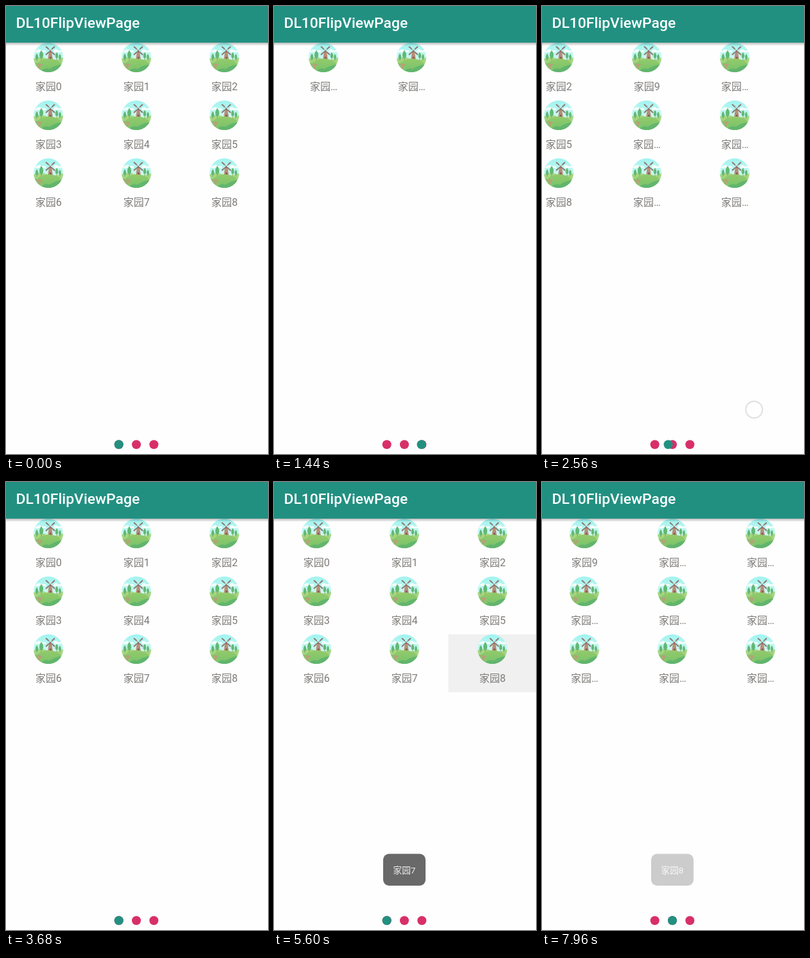
An HTML page for the animation above (8000 ms loop, 408x697 px).

```html
<!DOCTYPE html>
<html lang="zh">
<head>
<meta charset="utf-8">
<title>DL10FlipViewPage</title>
<style>
  html, body { margin: 0; width: 100%; height: 100%; overflow: hidden; background: #fefefe; }
  svg { display: block; width: 100vw; height: 100vh; }
  text { font-family: Roboto, "Noto Sans CJK SC", "Noto Sans CJK", sans-serif; }
  .label { font-size: 16px; fill: #7d7b78; text-anchor: middle; }
  .title { font-size: 22.9px; font-weight: 500; fill: #fff; }
  .toast rect { fill: #696969; }
  .toast text { font-size: 13.7px; fill: #eee; text-anchor: middle; }
</style>
</head>
<body>
<svg viewBox="0 0 408 697">
  <defs>
    <linearGradient id="sky" x2="0" y2="1">
      <stop stop-color="#9ff3f0"/><stop offset=".5" stop-color="#c9f7f0"/>
    </linearGradient>
    <linearGradient id="hill" x2="0" y2="1">
      <stop stop-color="#93cb6b"/><stop offset="1" stop-color="#72c06a"/>
    </linearGradient>
    <linearGradient id="shadow" x2="0" y2="1">
      <stop stop-color="#000" stop-opacity=".27"/><stop offset="1" stop-color="#000" stop-opacity="0"/>
    </linearGradient>
    <clipPath id="disc"><circle r="23"/></clipPath>
    <clipPath id="body"><rect y="57" width="408" height="640"/></clipPath>
    <g id="tree">
      <path d="M0 3V8" stroke="#8f9a62"/>
      <path d="M0 -8C4 -4 4 4 0 5C-4 4 -4 -4 0 -8Z" fill="#62b878"/>
    </g>
    <g id="home" clip-path="url(#disc)">
      <rect x="-23" y="-23" width="46" height="46" fill="url(#sky)"/>
      <path d="M-20 -10q5-5 9-1h7v3h-18ZM8 -11q4-4 7 0h8v3h-15Z" fill="#f2fdfa"/>
      <path d="M-23 2Q-13 -3 -2 2T23 0V23H-23Z" fill="#a5d680"/>
      <use href="#tree" x="-11" y="-3"/>
      <use href="#tree" transform="translate(-18 0) scale(.75)"/>
      <use href="#tree" transform="translate(13 -2) scale(.75)"/>
      <use href="#tree" transform="translate(18 0) scale(.65)"/>
      <path d="M-1 4L1 -9Q3 -12 5 -9L7 4Z" fill="#b98c76"/>
      <path d="M0 -8Q3 -13 6 -8Z" fill="#94695c"/>
      <path d="M2 3v-4h2.5v4Z" fill="#866052"/>
      <path d="M-4 -17L10 -4M10 -17L-4 -4" stroke="#8d7a72"/>
      <path d="M-4 -17l4.5 4M10 -17l-4.5 4M-4 -4l4.5-4M10 -4l-4.5-4" stroke="#8d7a72" stroke-width="2"/>
      <ellipse cx="1" cy="14" rx="20" ry="12" fill="url(#hill)"/>
      <path d="M-23 9Q-14 7 -7 12Q-11 14 -9 19L-17 23L-23 19Z" fill="#83c86c"/>
      <path d="M-20 10Q-14 9 -8 11Q-13 13 -12 17L-17 18Q-12 13 -20 10Z" fill="#b8a07a"/>
      <path d="M-14 23Q-6 15 2 18Q12 11 23 11V23Z" fill="#62b56e"/>
    </g>
  </defs>

  <rect width="408" height="697" fill="#fefefe"/>
  <g clip-path="url(#body)">
    <rect id="press" y="237" width="137" height="90" fill="#f0f0f0" opacity="0"/>
    <g id="pages"></g>
  </g>
  <rect y="57" width="408" height="5" fill="url(#shadow)"/>
  <rect width="408" height="57" fill="#229081"/>
  <text class="title" x="15.5" y="34">DL10FlipViewPage</text>

  <g fill="#d82f69">
    <circle cx="175.7" cy="682.3" r="7"/><circle cx="203" cy="682.3" r="7"/><circle cx="230.3" cy="682.3" r="7"/>
  </g>
  <circle id="dot" cx="175.7" cy="682.3" r="7" fill="#229081"/>

  <g class="toast" opacity="0"><rect x="170" y="578.5" width="66" height="49.5" rx="9"/><text x="203" y="609">家园7</text></g>
  <g class="toast" opacity="0"><rect x="170" y="578.5" width="66" height="49.5" rx="9"/><text x="203" y="609">家园8</text></g>
  <circle id="touch" r="13" fill="#fff" fill-opacity=".8" stroke="#dfdfdf" stroke-width="2" opacity="0"/>
</svg>
<script>
const LOOP = 8000, PAGE = 411, COL = 137, ROW = 90, SLOP = 10;
const $ = id => document.getElementById(id);
const clamp = v => Math.max(0, Math.min(1, v));
const span = (t, a, b) => clamp((t - a) / (b - a));

const swipes = [
  { start: 440, release: 660, end: 940, from: 0, to: 1, x0: 320, x1: 60, y: 475 },
  { start: 960, release: 1180, end: 1640, from: 1, to: 2, x0: 326, x1: 45, y: 270 },
  { start: 1680, release: 1880, end: 2240, from: 2, to: 1, x0: 110, x1: 320, y: 520 },
  { start: 2400, release: 2580, end: 2840, from: 1, to: 0, x0: 223, x1: 343, y: 628 },
  { start: 7280, release: 7500, end: 7920, from: 0, to: 1, x0: 312, x1: 26, y: 345 }
];
const taps = [
  { start: 3760, up: 3900, end: 4400, col: 1 },
  { start: 5280, up: 5440, end: 5920, col: 2 }
];
const toasts = [
  { show: 4040, shown: 4440, hide: 6040, gone: 6280 },
  { show: 6120, shown: 6440, hide: 7840, gone: 8020 }
];
const toastNodes = document.querySelectorAll('.toast');

let cells = '';
for (let i = 0; i < 20; i++) {
  const slot = i % 9;
  const x = 66 + Math.floor(i / 9) * PAGE + slot % 3 * COL;
  const y = 80 + Math.floor(slot / 3) * ROW;
  cells += `<use href="#home" x="${x}" y="${y}"/>` +
    `<text class="label" x="${x + .3}" y="${y + 51}">家园${i < 10 ? i : '…'}</text>`;
}
$('pages').innerHTML = cells;

const fingerX = (s, t) => s.x0 + (s.x1 - s.x0) * span(t, s.start, s.release);

function dragScroll(s, t) {
  const moved = s.x0 - fingerX(s, t);
  return s.from * PAGE + Math.sign(moved) * Math.max(0, Math.abs(moved) - SLOP);
}

function scrollAt(t) {
  const s = swipes.filter(w => t >= w.start).pop();
  if (!s) return 0;
  if (t < s.release) return dragScroll(s, t);
  const goal = s.to * PAGE;
  const left = (1 - span(t, s.release, s.end)) ** 3;
  return goal + (dragScroll(s, s.release) - goal) * left;
}

function draw(t) {
  const scroll = scrollAt(t);
  $('pages').setAttribute('transform', `translate(${-Math.round(scroll)} 0)`);
  $('dot').setAttribute('cx', 175.7 + 27.3 * scroll / PAGE);

  const swipe = swipes.find(s => t >= s.start && t < s.release);
  const tap = taps.find(p => t >= p.start && t < p.end);
  const held = tap && t < tap.up;
  if (swipe || held) {
    $('touch').setAttribute('cx', swipe ? fingerX(swipe, t) : 203 + (tap.col - 1) * COL);
    $('touch').setAttribute('cy', swipe ? swipe.y : 282);
  }
  $('touch').setAttribute('opacity', swipe || held ? 1 : 0);

  if (tap) $('press').setAttribute('x', tap.col * COL - 2.5);
  $('press').setAttribute('opacity', tap ? span(t, tap.start, tap.up) * (1 - span(t, tap.end - 280, tap.end)) : 0);

  toasts.forEach((m, i) => {
    const alpha = span(t, m.show, m.shown) * (1 - span(t, m.hide, m.gone));
    toastNodes[i].setAttribute('opacity', alpha);
  });
}

function tick() {
  draw(performance.now() % LOOP);
  requestAnimationFrame(tick);
}
tick();
</script>
</body>
</html>
```
